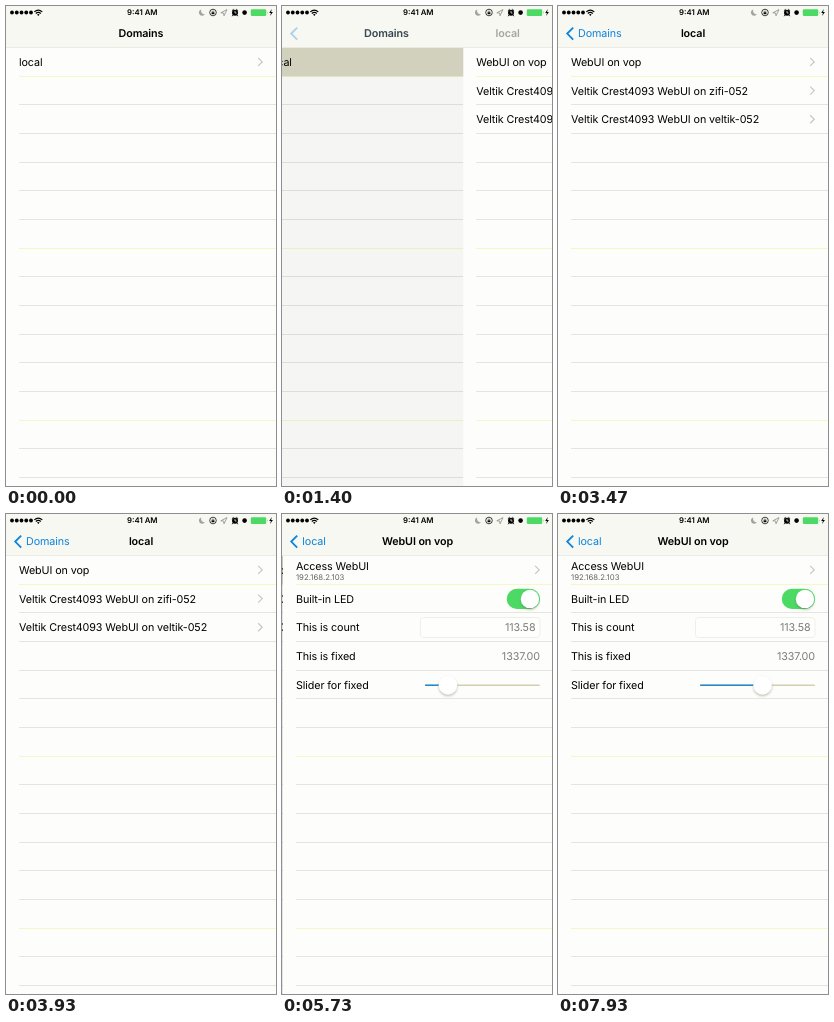
An HTML page for the animation above (8 s loop, 270 by 480 pixels).

```html
<!DOCTYPE html>
<html lang="en">
<head>
<meta charset="utf-8">
<title>Service browser</title>
<style>
  html, body { margin: 0; width: 100%; height: 100%; overflow: hidden; background: #fdfdfb; }
  svg { display: block; }
  text {
    font: 10.75px Inter, sans-serif; letter-spacing: -.1px;
    white-space: pre; text-rendering: geometricPrecision;
  }
  .title { font-weight: 600; text-anchor: middle; }
  .back { fill: #0b84dc; }
  .value { fill: #7c7c78; text-anchor: end; }
  .small { font-size: 7.8px; letter-spacing: 0; }
  .clock { font-weight: 600; text-anchor: middle; }
</style>
</head>
<body>
<svg id="stage" width="270" height="480" viewBox="0 0 270 480"></svg>
<script>
const LOOP = 8000, WIDTH = 270, TOP = 41.7, ROW = 28.67;
const PUSHES = [1345, 5358];      // start of each page push
const TAPS = [1210, 5345];        // row highlight before each push
const SPRING = 0.021;             // per ms, critically damped
const TITLES = ['Domains', 'local', 'WebUI on vop'];
const BACK_CENTERS = [42, 32];    // where a title ends up as a back label

const baseline = row => TOP + ROW * (row + 0.5) + 3.9;
const label = (row, text) => `<text x="13" y="${baseline(row)}">${text}</text>`;
const value = (row, x, text) => `<text class="value" x="${x}" y="${baseline(row)}">${text}</text>`;
const disclosure = row =>
  `<path d="M252.2 ${baseline(row) - 8}l4 4-4 4" fill="none" stroke="#c7c7c2" stroke-width="1.2"/>`;
const linkRow = (text, row) => label(row, text) + disclosure(row);

function separators() {
  let lines = '';
  for (let n = 1; n <= 15; n++) {
    const color = n % 6 === 1 ? '#f6f6c8' : '#e5e5e0';
    lines += `<rect x="13" y="${Math.floor(TOP + ROW * n - 0.3)}" width="257" height="1" fill="${color}"/>`;
  }
  return lines;
}

const page = (index, content) => `
  <g id="page${index}">
    <rect width="270" height="480" fill="#fdfdfb"/>
    ${separators()}
    <rect id="tap${index}" y="${TOP}" width="270" height="${ROW}" fill="#d9d8c4"/>
    ${content}
    <rect id="dim${index}" width="270" height="480"/>
  </g>`;

const details = `
  <text x="13" y="55.5">Access WebUI</text>
  <text class="small" x="13" y="66" fill="#66665c">192.168.2.103</text>
  ${disclosure(0)}
  ${label(1, 'Built-in LED')}
  <rect x="223.8" y="74.8" width="33.3" height="20.2" rx="10.1" fill="#4cd964"/>
  <circle cx="247" cy="84.9" r="9.2" fill="#fff" filter="url(#shadow)"/>
  ${label(2, 'This is count')}
  <rect x="137.5" y="103.5" width="119.5" height="20" rx="3" fill="#fefefd" stroke="#ececE6" stroke-width=".8"/>
  ${value(2, 252.5, '113.58')}
  ${label(3, 'This is fixed')}
  ${value(3, 257, '1337.00')}
  ${label(4, 'Slider for fixed')}
  <rect x="142" y="170.6" width="115" height="1.4" rx=".7" fill="#d2d0ae"/>
  <rect id="filled" x="142" y="170.6" height="1.4" rx=".7" fill="#2388d0"/>
  <circle id="thumb" cy="171.2" r="9.2" fill="#fff" filter="url(#shadow)"/>`;

const dots = [0, 1, 2, 3, 4].map(i => `<circle cx="${6 + i * 4.75}" cy="6.5" r="1.9"/>`).join('');
const statusBar = `
  ${dots}
  <g fill="none" stroke="#000" stroke-width="1.2">
    <path d="M28.3 5.9Q32.3 2.3 36.3 5.9M29.8 7.5Q32.3 5.3 34.8 7.5"/>
  </g>
  <path d="M31 8.6Q32.3 7.6 33.6 8.6L32.3 10z"/>
  <text class="small clock" x="136.3" y="9.4">9:41 AM</text>
  <path d="M195.2 3.4A3.3 3.3 0 1 0 199 8.3A3.7 3.7 0 0 1 195.2 3.4z" fill="#a2a2a0"/>
  <circle cx="207" cy="6.5" r="3.3" fill="none" stroke="#111" stroke-width=".8"/>
  <path d="M205.6 6.3h2.8v1.9h-2.8z"/>
  <path d="M206.1 6.3v-.8q.9-1.3 1.8 0v.8" fill="none" stroke="#111" stroke-width=".5"/>
  <path d="M214.8 6.8L221 3.6 218 9.8 217.6 7z" fill="none" stroke="#8c8c88" stroke-width=".8"/>
  <circle cx="229" cy="6.8" r="3"/>
  <path d="M225.9 4.8l1.8-1.6M232.1 4.8l-1.8-1.6M227 9l-.8 1.2M231 9l.8 1.2" fill="none" stroke="#000" stroke-width=".9"/>
  <path d="M229 4.9v2.1h1.5" fill="none" stroke="#fff" stroke-width=".7"/>
  <circle cx="238.6" cy="6.6" r="2.3"/>
  <rect x="244.8" y="3.2" width="15.4" height="6.8" rx="1.2" fill="#4cd964"/>
  <path d="M261 5.3q1.2 1.3 0 2.6z" fill="#4cd964"/>
  <path d="M265.8 3l-2.6 4h1.7l-.8 3 2.8-4.1h-1.8z"/>`;

const navBar = `
  <rect width="270" height="${TOP}" fill="#f8f8f2"/>
  <rect y="41" width="270" height=".7" fill="#e6e6dc"/>
  <path id="chevron" d="M15.2 21.6l-6 6 6 6" fill="none" stroke="#0b84dc" stroke-width="1.8"/>
  ${TITLES.map((text, i) => `
    <text id="back${i}" class="back" x="20" y="31.4">${text}</text>
    <text id="title${i}" class="title" x="135" y="31.4">${text}</text>`).join('')}`;

document.getElementById('stage').innerHTML = `
  <defs><filter id="shadow" x="-40%" y="-40%" width="180%" height="190%">
    <feDropShadow dx="0" dy="1.5" stdDeviation="1.3" flood-color="#5c5b44" flood-opacity=".4"/>
  </filter></defs>
  ${page(0, linkRow('local', 0))}
  ${page(1, ['WebUI on vop', 'Veltik Crest4093 WebUI on zifi-052',
             'Veltik Crest4093 WebUI on veltik-052'].map(linkRow).join(''))}
  ${page(2, details)}
  ${navBar}${statusBar}`;

const set = (id, attributes) => {
  const element = document.getElementById(id);
  for (const name in attributes) element.setAttribute(name, attributes[name]);
};
const shift = x => `translate(${x.toFixed(2)} 0)`;

function spring(elapsed) {
  if (elapsed <= 0) return 0;
  if (elapsed > 600) return 1;
  const u = elapsed * SPRING;
  return 1 - (1 + u) * Math.exp(-u);
}

function smooth(time, from, to) {
  const u = Math.min(1, Math.max(0, (time - from) / (to - from)));
  return u * u * (3 - 2 * u);
}

function render(time) {
  const [first, second] = PUSHES.map(start => spring(time - start));
  const progress = [1, first, second, 0, 0];

  TITLES.forEach((_, i) => {
    const enter = progress[i], leave = progress[i + 1], gone = progress[i + 2];
    const travel = 135 - (BACK_CENTERS[i] ?? 35);
    set('page' + i, {
      transform: shift(WIDTH * (1 - enter) - WIDTH * 0.3 * leave),
      visibility: enter > 0 && leave < 1 ? 'visible' : 'hidden'
    });
    set('dim' + i, { opacity: 0.1 * leave });
    set('tap' + i, { opacity: time >= TAPS[i] ? 1 : 0 });
    set('title' + i, { transform: shift(135 * (1 - enter) - travel * leave), opacity: enter * (1 - leave) });
    set('back' + i, { transform: shift(travel * (1 - leave) - 50 * gone), opacity: leave * (1 - gone) });
  });
  set('chevron', { opacity: first });

  const thumb = 165 + 40 * smooth(time, 6900, 8000);
  set('thumb', { cx: thumb });
  set('filled', { width: thumb - 142 });
}

const start = performance.now();
function tick() {
  render((performance.now() - start) % LOOP);
  requestAnimationFrame(tick);
}
tick();
</script>
</body>
</html>
```
